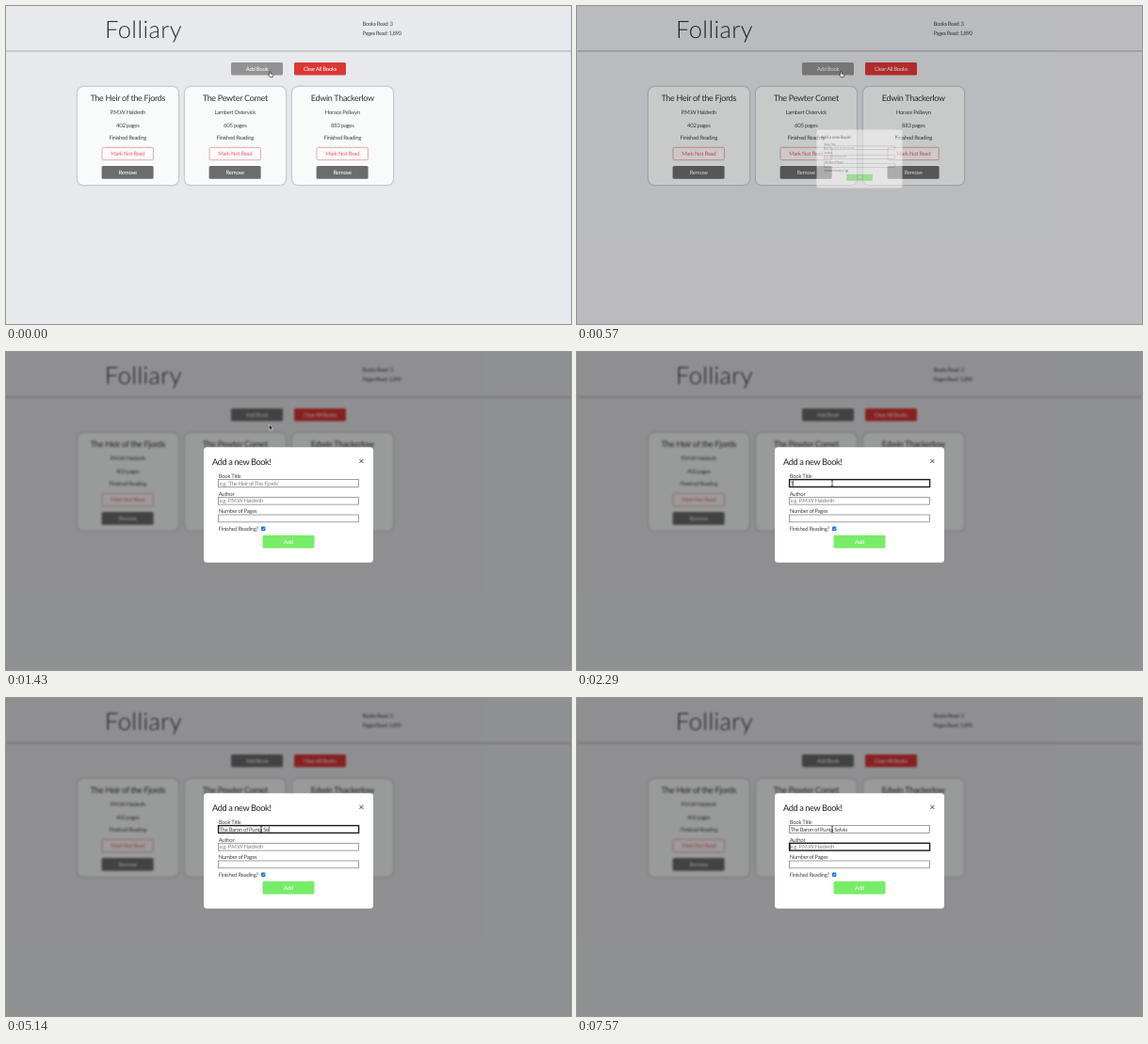
An HTML page that plays this animation: 600x338 px, repeating every 8 s.

```html
<!DOCTYPE html>
<html lang="en">
<head>
<meta charset="utf-8">
<title>Folliary</title>
<style>
  html, body { margin: 0; width: 100%; height: 100%; overflow: hidden; background: #e8e9ed; }
  svg { display: block; width: 600px; height: 338px; }
  text {
    font: 400 6px Lato, "Open Sans", sans-serif;
    letter-spacing: -.3px;
    fill: #48484a;
    white-space: pre;
    text-rendering: geometricPrecision;
  }
  .mid { text-anchor: middle; }
  .light { fill: #fff; }
  .logo { font-size: 25.5px; font-weight: 300; letter-spacing: .4px; fill: #2c2c2e; }
  .stat { letter-spacing: -.42px; }
  .name { font-size: 9px; fill: #333335; }
  .head { font-size: 9.2px; letter-spacing: -.4px; fill: #222; }
  .hint { fill: #85858a; }
  .warn { fill: #ea6472; }
  .field { fill: #fff; stroke: #77777b; stroke-width: .7; }
  .field.focus { stroke: #1c1c1e; stroke-width: 1.4; }
  .card { fill: #f9fafa; filter: drop-shadow(0 .9px .8px rgba(0, 0, 0, .4)); }
</style>
</head>
<body>
<svg viewBox="0 0 600 338">
  <rect width="600" height="338" fill="#e8e9ed"/>
  <g id="page">
    <rect y="47" width="600" height="1" fill="#c3c4c7"/>
    <rect y="48" width="600" height="1" fill="#cbccd0"/>
    <text class="logo" x="105" y="34">Folliary</text>
    <text class="stat" x="378.5" y="20.7">Books Read: 3</text>
    <text class="stat" x="378.5" y="31.1">Pages Read: 1,890</text>
    <rect id="addBook" x="239" y="60" width="55" height="13.6" rx="1.5"/>
    <text class="mid light" x="266.5" y="69">Add Book</text>
    <rect x="306" y="60" width="55" height="13.6" rx="1.5" fill="#db3734"/>
    <text class="mid light" x="333.5" y="69">Clear All Books</text>
    <g id="cards"></g>
  </g>
  <rect id="shade" width="600" height="338"/>
  <g id="modal">
    <rect x="210" y="101.3" width="180" height="122.4" rx="3.5" fill="#fff"/>
    <text class="head" x="219" y="119.5">Add a new Book!</text>
    <path d="M375.4 114l4 4m0-4l-4 4" stroke="#333" stroke-width=".9"/>
    <text x="225.7" y="134">Book Title</text>
    <rect id="titleField" class="field" x="225.6" y="135.6" width="149" height="7.8"/>
    <text id="titleHint" class="hint" x="226.4" y="141.6">e.g. 'The Heir of The Fjords'</text>
    <text id="typed" x="226.4" y="141.6"></text>
    <text x="225.7" y="152.6">Author</text>
    <rect id="authorField" class="field" x="225.6" y="154.3" width="149" height="7.8"/>
    <text class="hint" x="226.4" y="160.3">e.g. P.M.W Haldreth</text>
    <text x="225.7" y="171.3">Number of Pages</text>
    <rect class="field" x="225.6" y="173" width="149" height="7.8"/>
    <rect id="caret" width=".6" height="6" fill="#111"/>
    <text x="225.7" y="190">Finished Reading?</text>
    <rect x="271" y="185.6" width="4.4" height="4.4" rx=".8" fill="#1a6fd6"/>
    <path d="M272 187.8l1 1 1.6-2.1" fill="none" stroke="#fff" stroke-width=".7"/>
    <rect x="272.5" y="194.8" width="55" height="13.6" rx="1.5" fill="#78ec68"/>
    <text class="mid light" x="300" y="203.8">Add</text>
  </g>
  <g id="cursor">
    <path id="hand" fill="#fff" stroke="#111" stroke-width=".6" stroke-linejoin="round"
      d="M-.7-2.6q.7-.8 1.3 0v2l2.2.6q.6.3.5 1L2.8 3H-.2L-2 .6q.2-.8 1.3 0z"/>
    <path id="arrow" fill="#111" stroke="#fff" stroke-width=".5" d="M0-2.5v6l1.4-1.2 1 2 .9-.4-1-2h1.8z"/>
    <path id="beam" fill="none" stroke="#222" stroke-width=".7" d="M-1.2-2.8h2.4M0-2.8v5.6M-1.2 2.8h2.4"/>
  </g>
</svg>
<script>
  const $ = id => document.getElementById(id);
  const clamp = v => Math.min(1, Math.max(0, v));
  const smooth = v => v * v * (3 - 2 * v);

  const LOOP = 8000, TICK = 1000 / 7;
  const TITLE = 'The Baron of Punta Selvio';
  // letters shown on each tick, from the first key press on
  const FIRST_KEY = 16;
  const LETTERS = [1, 1, 2, 2, 3, 4, 5, 7, 8, 10, 11, 12, 13, 14, 15, 17, 17,
    18, 19, 20, 21, 21, 20, 21, 21, 22, 23, 24, 25];
  const FOCUS_TITLE = 15, FOCUS_AUTHOR = 49;
  const LEAVE = 9, ARRIVE = 14;

  const books = [
    ['The Heir of the Fjords', 'P.M.W Haldreth', 402],
    ['The Pewter Comet', 'Lambert Ostervick', 605],
    ['Edwin Thackerlow', 'Horace Pellwyn', 883]
  ];

  const label = (y, text, cls = '') => `<text class="mid ${cls}" x="53.3" y="${y}">${text}</text>`;

  $('cards').innerHTML = books.map(([title, author, pages], i) => `
    <g transform="translate(${76 + 114 * i} 0)">
      <rect class="card" y="86" width="107" height="104" rx="6"/>
      ${label(101.2, title, 'name')}
      ${label(115.2, author)}
      ${label(129.2, pages + ' pages')}
      ${label(142.3, 'Finished Reading')}
      <rect x="26" y="150.3" width="54.4" height="13.4" rx="1.5" fill="#fdfbfb" stroke="#e3a0a6" stroke-width=".9"/>
      ${label(159.2, 'Mark Not Read', 'warn')}
      <rect x="25.6" y="170" width="55" height="13.7" rx="1.5" fill="#6b6c6d"/>
      ${label(179.2, 'Remove', 'light')}
    </g>`).join('');

  function drawModal(time) {
    const p = smooth(clamp((time - 370) / 400));
    $('shade').setAttribute('fill-opacity', .385 * p);
    $('page').style.filter = p > 0 ? `blur(${.9 * p * p}px)` : 'none';
    $('modal').setAttribute('opacity', p);
    $('modal').setAttribute('transform', `translate(300 162.5) scale(${p}) translate(-300 -162.5)`);
  }

  function drawForm(tick) {
    const i = Math.min(tick - FIRST_KEY, LETTERS.length - 1);
    const count = i < 0 ? 0 : LETTERS[i];
    const onAuthor = tick >= FOCUS_AUTHOR;
    const onTitle = tick >= FOCUS_TITLE && !onAuthor;
    $('typed').textContent = TITLE.slice(0, count);
    $('titleHint').setAttribute('visibility', count ? 'hidden' : 'visible');
    $('titleField').classList.toggle('focus', onTitle);
    $('authorField').classList.toggle('focus', onAuthor);

    const width = onTitle && count ? $('typed').getComputedTextLength() : 0;
    $('caret').setAttribute('x', 226.3 + width);
    $('caret').setAttribute('y', onAuthor ? 155.2 : 136.5);
    $('caret').setAttribute('visibility', onTitle || onAuthor ? 'visible' : 'hidden');
  }

  function drawCursor(tick) {
    const p = smooth(clamp((tick - LEAVE) / (ARRIVE - LEAVE)));
    const shape = tick < LEAVE ? 'hand' : tick < ARRIVE ? 'arrow' : 'beam';
    for (const id of ['hand', 'arrow', 'beam'])
      $(id).setAttribute('visibility', id === shape ? 'visible' : 'hidden');
    $('cursor').setAttribute('transform', `translate(${280.4 - 9.4 * p} ${72.5 + 67 * p})`);
    $('addBook').setAttribute('fill', shape === 'hand' ? '#929292' : '#6b6c6d');
  }

  function frame() {
    const tick = Math.floor((performance.now() % LOOP + 6) / TICK);
    drawModal(tick * TICK);
    drawForm(tick);
    drawCursor(tick);
    requestAnimationFrame(frame);
  }
  frame();
</script>
</body>
</html>
```
